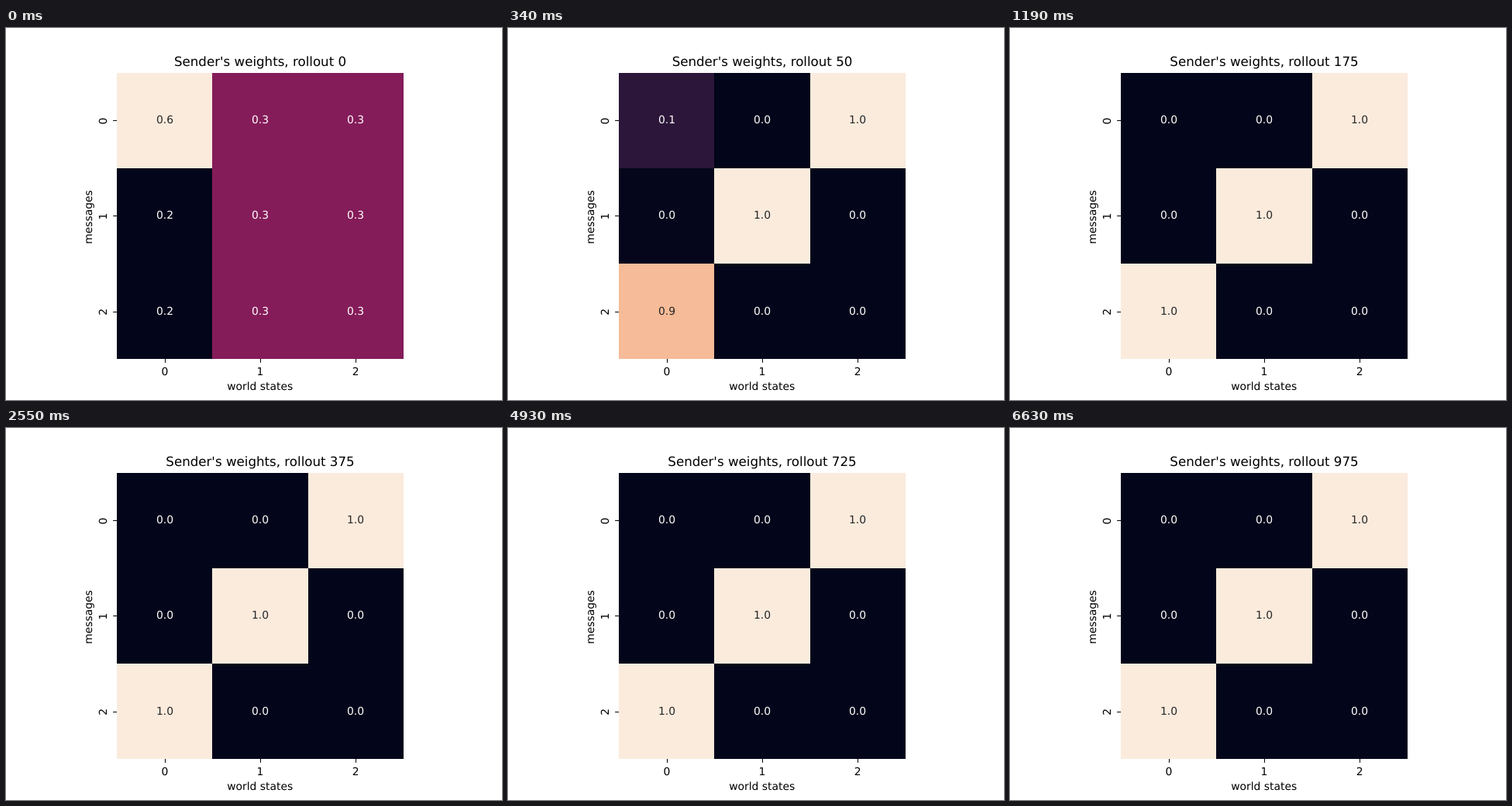
An HTML page for the animation above (6.8 s loop, 640x480 px).

```html
<!DOCTYPE html>
<html lang="en">
<head>
<meta charset="utf-8">
<title>Sender's weights</title>
<style>
  html, body { margin: 0; width: 100%; height: 100%; overflow: hidden; background: #fff; }
  svg { display: block; width: 640px; height: 480px; }
  text { font: 13.889px "DejaVu Sans", sans-serif; text-anchor: middle; text-rendering: geometricPrecision; }
  .title { font-size: 16.667px; }
</style>
</head>
<body>
<svg id="stage" viewBox="0 0 640 480"></svg>
<script>
const STEP = 170, COUNT = 40, PER_STEP = 25;
const LEFT = 143.2, TOP = 57.6, CELL = 123.2, SIZE = 3;
const RAMP = ['#03051a', '#35193e', '#701f57', '#ad1759', '#e13342', '#f37651', '#f6b48f', '#faebdd']
  .map(hex => [1, 3, 5].map(i => parseInt(hex.slice(i, i + 2), 16)));

// Per state: bias to message 0, early drift, and when and how fast the final message wins
const STATES = [
  { bias: 1.1, drift: .95, onset: 1, gain: 5 },
  { bias: 0, drift: 2.05, onset: 1, gain: 9 },
  { bias: 0, drift: 0, onset: 0, gain: 12 }
];

const stage = document.getElementById('stage');
const colX = i => LEFT + CELL * i;
const rowY = i => TOP + CELL * i;

function add(tag, attrs, content = '') {
  const el = document.createElementNS('http://www.w3.org/2000/svg', tag);
  for (const key in attrs) el.setAttribute(key, attrs[key]);
  el.textContent = content;
  stage.append(el);
  return el;
}

function label(x, y, content, turned) {
  return add('text', turned ? { transform: `translate(${x} ${y}) rotate(-90)` } : { x, y }, content);
}

// Smooth curve through the evenly spaced ramp colours
function colour(v) {
  const last = RAMP.length - 1;
  const i = Math.min(last - 1, Math.floor(v * last)), t = v * last - i;
  const rgb = RAMP[i].map((b, k) => {
    const c = RAMP[i + 1][k];
    const a = i > 0 ? RAMP[i - 1][k] : 2 * b - c;
    const d = i + 2 <= last ? RAMP[i + 2][k] : 2 * c - b;
    return Math.round(b + t * (c - a + t * (2 * a - 5 * b + 4 * c - d + t * (3 * (b - c) + d - a))) / 2);
  });
  return `rgb(${rgb})`;
}

// Softmax over the messages of one state
function column({ bias, drift, onset, gain }, state, n) {
  const odds = Array.from({ length: SIZE }, (_, row) => Math.exp(
    (row === 0 ? bias : 0) +
    (row <= state ? drift * n : 0) +
    (row === SIZE - 1 - state ? gain * Math.max(0, n - onset) : 0)));
  const sum = odds.reduce((a, b) => a + b);
  return odds.map(o => o / sum);
}

const title = label(328, 49, '');
title.setAttribute('class', 'title');

const cells = Array.from({ length: SIZE * SIZE }, (_, i) => {
  const col = i % SIZE, row = Math.floor(i / SIZE);
  const x = Math.round(colX(col)), y = Math.round(rowY(row));
  const box = add('rect', {
    x, y, width: Math.round(colX(col + 1)) - x, height: Math.round(rowY(row + 1)) - y
  });
  return { col, row, box, value: label(Math.round(colX(col + .5)) + .1, rowY(row + .5) + 4, '') };
});

for (let i = 0; i < SIZE; i++) {
  const x = colX(i + .5), y = rowY(i + .5);
  add('path', {
    d: `M${Math.round(x) + .5} 427v4.86M143 ${Math.round(y) + .5}h-4.86`, stroke: '#000'
  });
  label(x, 448, i);
  label(130, y + .8, i, true);
}
label(327.7, 467, 'world states');
label(111, 244, 'messages', true);

let shown = -1;
function draw(ms) {
  const n = Math.floor(ms / STEP) % COUNT;
  if (n === shown) return;
  shown = n;
  title.textContent = `Sender's weights, rollout ${n * PER_STEP}`;
  const columns = STATES.map((s, i) => column(s, i, n));
  const low = Math.min(...columns.flat()), high = Math.max(...columns.flat());
  for (const { col, row, box, value } of cells) {
    const w = columns[col][row], v = (w - low) / (high - low);
    box.setAttribute('fill', colour(v));
    value.setAttribute('fill', v > .7 ? '#262626' : '#fff');
    value.textContent = w.toFixed(1);
  }
}

let start;
function tick(now) {
  start ??= now;
  draw(now - start);
  requestAnimationFrame(tick);
}
draw(0);
requestAnimationFrame(tick);
</script>
</body>
</html>
```
